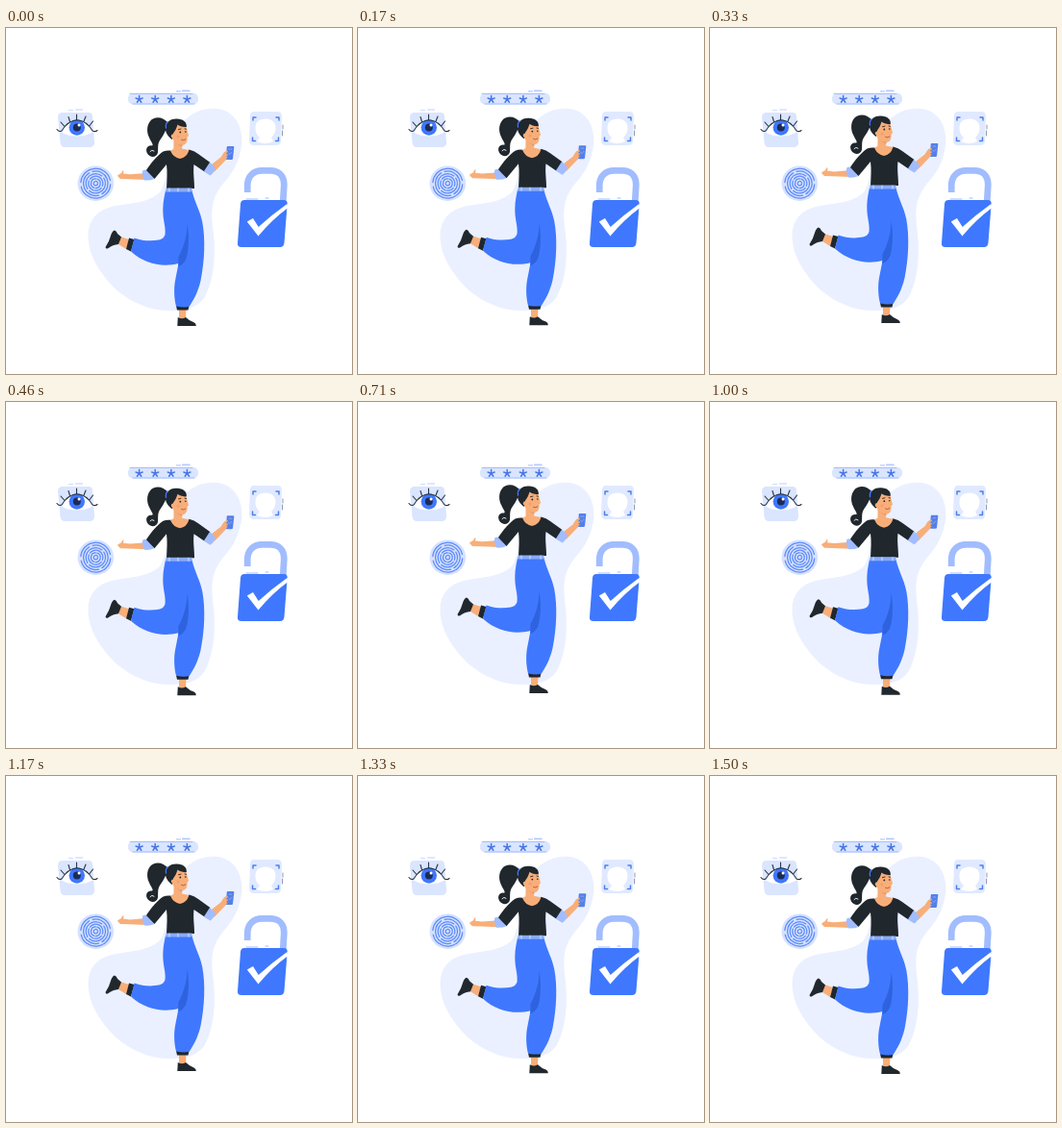
An HTML page for the animation above (1540 ms loop, 360 by 360 pixels).

```html
<!DOCTYPE html>
<html lang="en">
<head>
<meta charset="utf-8">
<title>Secure sign-in</title>
<style>
html, body { margin: 0; width: 100%; height: 100%; overflow: hidden; background: #fff; }
svg { display: block; width: 100vw; height: 100vh; }
.blue { fill: #3f78fe; }
.mid { fill: #a1bdff; }
.pale { fill: #dae5ff; }
.dark { fill: #20272d; }
.skin { fill: #f8ae78; }
.line { fill: none; stroke-linecap: round; stroke-linejoin: round; }
</style>
</head>
<body>
<svg viewBox="0 0 360 360">
  <path fill="#eaf0ff" d="M184 98C194 87 207 83 220 84C238 86 246 103 245.500 118C244 138 236 151 225 163C214 177 213 190 215.500 210C219 237 216 264 206 281C198 292 185 294 169 294C146 294 120 281 105 262C92 246 84.500 230 85.500 213C87.500 195 100 187 117 184.500C136 182 151 180 160 171C170 158 171 113 184 98Z"/>

  <g id="password">
    <path class="mid" d="M177 65.2h5v1.2h-5zM183 64.4h8l1 1.8h-9z" opacity=".8"/>
    <rect class="pale" x="127" y="68" width="73" height="11.5" rx="5"/>
    <path class="line" stroke="#a0baff" stroke-width="1" d="M129 68.4H194M132 79H196"/>
    <g id="stars" class="line" stroke="#4675e4" stroke-width="1.5"></g>
  </g>

  <g id="eye">
    <path class="mid" d="M65 85.2H70V86H65zM72 84.6H80V85.6H72z" opacity=".7"/>
    <path class="pale" d="M59 88H86Q90 88 90 92L92 119Q92 124 87 124H61Q57 124 56.500 119L54 93Q54 88 59 88Z"/>
    <path fill="#fff" d="M57 108Q63 97 74 96Q85 97 91 108Q83 112.500 74 112.500Q64 112.500 57 108Z"/>
    <circle class="blue" cx="73.800" cy="103.500" r="8.200"/>
    <circle cx="73.800" cy="103.500" r="4" fill="#1d2b58"/>
    <circle cx="76" cy="101" r="1.500" fill="#fff"/>
    <path class="line" stroke="#29334a" stroke-width="1.100" d="M53 105.500Q55 108.500 58 107Q64 96.500 74 95.700Q84 96.500 90 107Q93 108.500 95 106.500M60.500 102L57 98M66.500 97.500L65 92.500M73.500 95.300V90M81 97L83 92M87 101.500L90.500 97"/>
  </g>

  <g id="print">
    <ellipse cx="93.300" cy="161.700" rx="18.800" ry="18.300" fill="#d5e1ff"/>
    <g id="rings" class="line" stroke="#5c8bfa" stroke-width="1.250"></g>
  </g>

  <g id="scan">
    <path fill="#e0e9ff" d="M258 87H282Q287 87 287 92L286 118Q286 122 281 122H258Q253 122 253 117L254 92Q254 87 258 87Z"/>
    <path fill="#fff" d="M270 94.500C277 94.500 281 99 280.500 105C280 110 278 112 276 114L278 118Q270 122 261 118L264 114C261 111 259.500 109 259.500 104C259.500 98 263 94.500 270 94.500Z"/>
    <path class="line" stroke="#4d7ff0" stroke-width="1.500" d="M257 96V93H260M281 93H284V96M256.500 114V117.500H259.500M280.500 117.500H283.500V114"/>
    <path class="line" stroke="#9098b8" stroke-width="1" d="M288 101V105M287.500 107V112"/>
  </g>

  <g id="lock">
    <path class="line" style="stroke-linecap:butt" stroke="#a1bdff" stroke-width="6.800" d="M251.200 171V164C251.200 154 258 148.300 266 148.300H275C284 148.300 289.300 154 289.300 163L288.300 180"/>
    <path class="line" stroke="#a1bdff" stroke-width="1" d="M250 178H262M270 177H273"/>
    <path class="blue" d="M248 179H289Q293 179 292.700 183L289.500 223.500Q289 228 285 228H245Q240.500 228 241 223.500L244 183Q244.300 179 248 179Z"/>
    <path fill="#fff" d="M250.800 201.500L257 198L262.700 207Q277 194 292.500 183L293.500 187Q277 199 262.500 216.500Z"/>
  </g>

  <g id="woman">
    <!-- ponytail -->
    <path class="dark" d="M168.500 99C164 92 154 91.500 150 97C146 102 146.500 109 149 114C151 119 154 121.500 152 122.500C147.500 121.500 144.500 126 147 130.500C150 135.500 157 135 158 129.500C158.500 125 157.500 121 160 117C163 112.500 167 107 168.500 99Z"/>
    <path class="line" stroke="#fff" stroke-width=".9" d="M150 128.500Q151.500 126 154 128"/>

    <!-- bare arms -->
    <path class="skin" d="M146 151L129 152.300L122 151.500L122.500 148.300Q121 147.500 120 151L116.500 153Q115.500 154 117 155L119 157L128 157.200L146 158Z"/>
    <path class="skin" d="M212.500 143L223.500 134.500L226 130.500L230 127.500L231.500 132L229.500 136.500L216.500 150Z"/>

    <!-- raised foot -->
    <path class="skin" d="M119 217L128 220L125 230L117 225Z"/>
    <path class="dark" d="M113 210.500Q115 211 116 214L120 217.500L117 225Q111 225.500 106.500 229Q104 230.500 103.500 228Q107.500 222 109 216Q110.500 211 113 210.500Z"/>
    <path class="dark" d="M128 218.500L133.500 220L130 232.500L125 230Z"/>

    <!-- standing foot -->
    <path class="skin" d="M180 292H187.500L187 303H180Z"/>
    <path class="dark" d="M178.800 301Q183 303.500 187 301Q191 305 195.500 306.300Q198 307.300 197.800 310H178.300Z"/>
    <path class="dark" d="M177 289H190.500L189.500 293.500H178Z"/>

    <!-- trousers -->
    <path class="blue" d="M166 169H193.500C196.500 182 202 190 204.300 202C207.500 219 206.800 242 202.500 263C199.500 276 194.500 284 190.500 290Q184 291 177 289.500C175 282 174.500 271 176 263L179.500 245C163 249 145 246 130 232.500L133.500 218.500C142 221.500 151 222 159 220.500Q164 219.500 165.500 215C166.500 207 163 200 163.300 188C163.500 180 165 174 166 169Z"/>
    <path fill="#2f62de" d="M188.500 204C191 216 190 234 187 241Q184 246.500 179.300 248L179.500 238C185 228 188.500 216 188.500 204Z"/>

    <!-- shirt -->
    <path class="dark" d="M171 127.500Q181 135 190.500 126.500Q196 127.500 200 131L212.500 140L206.500 149.500L195.500 142C194.500 151 196 158 196 167H167C167.500 158 168 150 167 142L154.500 157L145 149.500C151 140 158 132 163.500 128.500Q167 127 171 127.500Z"/>
    <path class="mid" d="M212 139.800L218 145.500Q216.500 151 212.500 153.500L205.800 149.300Z"/>
    <path class="mid" d="M145.500 147.500L154.500 157Q150 159 144 158.500Q140.500 153 142.500 148Z"/>
    <path fill="#89abf8" d="M166.500 166.500H193.500V170.500H166Z"/>
    <path class="line" stroke="#d5e2ff" stroke-width="1" d="M170 167V170M179 167V170M190 167V170"/>

    <!-- neck and face -->
    <path class="skin" d="M174.500 115L183.500 119L183 125.500L190.500 127Q188 135 181 136Q174 135 171 127.500L174.500 126Z"/>
    <path fill="#e6986c" d="M176.500 118.500L183.700 121L183.300 123.500Q179 122 176.500 118.500Z"/>
    <path class="skin" d="M171.500 103Q180 96 187.300 101.500L188.700 107L190 112L188.500 113.800Q189 120 185 121.700Q176.500 122.500 172.500 114Z"/>
    <path class="dark" d="M166 104C167 97 172 94 178 94.500C184 94.500 188.500 98 187.800 103C184 103.500 180.500 102 178.500 100.500C177.500 104 176 107 174 109.500C174 112 173.500 115 172.500 116C169 113 165.500 109 166 104Z"/>
    <path class="line" stroke="#3f78fe" stroke-width="1.300" d="M168 97.500Q165.800 100 166.500 104"/>
    <circle class="skin" cx="174" cy="112.500" r="2.200"/>
    <path class="line" stroke="#28292d" stroke-width=".9" d="M179.500 105.600L182 105M186 104.900L187.500 105.200"/>
    <circle class="dark" cx="181.300" cy="108.400" r=".9"/>
    <circle class="dark" cx="186.800" cy="108" r=".8"/>
    <path class="line" stroke="#b95546" stroke-width=".9" d="M182.500 116.300Q185 117.800 187 115.700"/>
    <circle cx="179" cy="113" r="1.500" fill="#ee8d70" opacity=".5"/>

    <!-- phone -->
    <path fill="#5580e8" d="M230.500 123H236.500Q237.500 123 237.300 124.200L236 136Q235.800 137 234.800 137H230Q229 137 229 136L229.700 124Q229.800 123 230.500 123Z"/>
    <path class="line" stroke="#8fadf6" stroke-width=".8" d="M232 126H235M231.500 130L233 131.500L235 129"/>
    <path class="line" stroke="#f8ae78" stroke-width="1.800" d="M227.500 130L230 128.500M227.500 133L230 132M227 135.500L229.500 134.700"/>
  </g>
</svg>
<script>
const LOOP = 1540, STEPS = 37, RISE = 7;
const el = id => document.getElementById(id);
const woman = el('woman');

function addPath(parent, d) {
  const path = document.createElementNS('http://www.w3.org/2000/svg', 'path');
  path.setAttribute('d', d);
  parent.append(path);
}

function polar(cx, cy, r, angle) {
  return `${cx + r * Math.cos(angle)} ${cy + r * Math.sin(angle)}`;
}

// Five-armed asterisks, one arm pointing up.
for (let i = 0; i < 4; i++) {
  const x = 138.6 + i * 16.6;
  for (let k = 0; k < 5; k++) {
    addPath(el('stars'), `M${x} 74.2L${polar(x, 74.2, 3.7, (k * 0.4 - 0.5) * Math.PI)}`);
  }
}

// Each ring is split into two arcs with staggered gaps.
for (let i = 0; i < 6; i++) {
  const r = 2.2 + i * 2.65;
  for (let k = 0; k < 2; k++) {
    const a = i * 1.9 + k * Math.PI, b = a + 2.85;
    addPath(el('rings'), `M${polar(93.3, 161.7, r, a)}A${r} ${r} 0 0 1 ${polar(93.3, 161.7, r, b)}`);
  }
}

const stepStart = i => Math.round(i * LOOP / STEPS / 10) * 10;

function render(ms) {
  const t = ms % LOOP;
  let i = STEPS - 1;
  while (i > 0 && stepStart(i) > t) i--;
  const phase = 2 * Math.PI * i / (STEPS - 1);
  const y = -RISE / 2 * (1 - Math.cos(phase));
  woman.setAttribute('transform', `translate(0 ${y.toFixed(2)})`);
}

let start;
function tick(now) {
  start ??= now;
  render(now - start);
  requestAnimationFrame(tick);
}
render(0);
requestAnimationFrame(tick);
</script>
</body>
</html>
```
